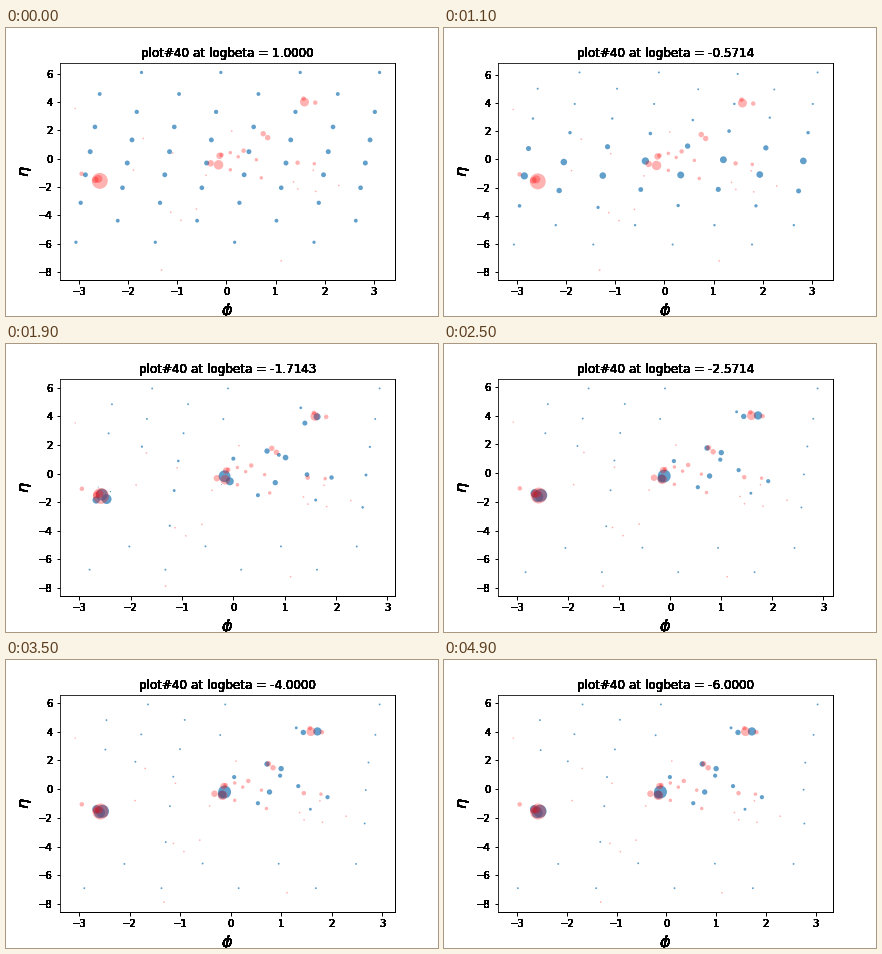
Animation, 432 px wide and 288 px high, one loop 5 s. Source, as a matplotlib script:

```python
import numpy as np
import matplotlib.pyplot as plt
from matplotlib.animation import FuncAnimation
from matplotlib.text import Text
from matplotlib.ticker import MultipleLocator

FRAMES, INTERVAL = 50, 100
ROWS, COLS = 12, 4
SPREAD_END = 11            # frame where the lattice is evenly spaced
TEXT_PASSES = 16
PIXELS = np.array([49.0, 14.2])   # per unit of phi and eta
SWALLOW = 40               # reach of a heavy dot, in pixels

# (phi, eta, diameter) of the clumps in the fixed cloud.
CLUMPS = np.array([
    (-2.58, -1.56, 16), (-2.61, -1.42, 8), (-2.67, -1.49, 6.5),
    (-2.95, -1.06, 4.5), (-0.16, -0.43, 9.5), (-0.14, 0.21, 6.5),
    (-0.32, -0.32, 6.5), (-0.10, 0.28, 4.5), (1.59, 4.01, 9),
    (1.57, 4.25, 4.5), (1.81, 3.97, 4.5), (0.75, 1.77, 5.5),
    (0.84, 1.49, 5.5), (0.35, 0.57, 4.5), (1.45, -0.28, 4.5),
    (0.08, 0.43, 3.5), (0.08, -0.78, 3.5), (0.24, 0.14, 3.5),
    (0.71, -1.35, 3.5), (0.61, -0.07, 3.5), (1.79, -0.35, 3.5),
    (-3.08, 3.55, 1.5), (-1.32, -7.87, 1.8),
])

# Where the heavy moving dots settle, largest first.
SEATS = np.array([
    (-2.54, -1.54, 13), (-0.12, -0.20, 13), (-2.60, -1.64, 11),
    (-2.66, -1.40, 8.3), (-0.17, -0.38, 8.3), (1.72, 4.02, 8.3),
    (1.44, 3.95, 5.4), (0.72, 1.75, 5.4), (1.00, 1.43, 5.4),
    (0.77, -0.20, 5.4), (0.07, 0.84, 4.2), (0.98, 0.94, 4.2),
    (0.54, -0.98, 4.2), (1.34, 0.21, 4.2), (1.92, -0.56, 4.2),
    (1.30, 4.27, 2.9), (1.58, -1.40, 2.9),
])

rng = np.random.default_rng(4)
row, col = (grid.ravel() for grid in np.mgrid[:ROWS, :COLS])
depth = 2 * row / (ROWS - 1) - 1     # -1 at the top row, 1 at the bottom
drift = rng.normal(0, 0.1, (ROWS * COLS, 2))


def smoothstep(t):
    t = np.clip(t, 0, 1)
    return t * t * (3 - 2 * t)


def gathering(frame):
    return smoothstep((frame - 9) / 14)


def lattice(frame):
    """Staggered rows that even out, then sag and wander a little."""
    s = min(frame / SPREAD_END, 1)
    late = max(frame - SPREAD_END, 0) / (FRAMES - 1 - SPREAD_END)
    right = np.interp(frame, [0, SPREAD_END, 19, FRAMES - 1],
                      [3.12, 3.12, 2.85, 3.04])
    x = -1.68 - 0.78 * (row % 2) - 0.047 * row + 1.57 * col
    x = x * right / x.max()
    y = (0.1 + 0.3 * s * (1 - depth**2)
         - (4.4 + 1.15 * s) * depth - (1.6 - 1.05 * s) * depth**3)
    y -= gathering(frame) * depth**2 * (0.6 + 0.3 * depth)
    inner = (1 - np.abs(depth))[:, None]
    return np.column_stack([x, y]) + inner * drift * late


def lattice_sizes(frame):
    s = min(frame / SPREAD_END, 1)
    even = 5 - 1.7 * depth**2
    peaked = 2 + 5.2 * np.exp(-((depth - 0.17) / 0.4)**2)
    return (1 - s) * even + s * peaked


def choose_seats():
    """Each seat takes its nearest free dot; other close dots are swallowed."""
    gap = (lattice(SPREAD_END)[:, None] - SEATS[None, :, :2]) * PIXELS
    distance = np.hypot(gap[..., 0], gap[..., 1])
    seat = np.full(len(row), -1)
    for k in range(len(SEATS)):
        seat[np.where(seat < 0, distance[:, k], np.inf).argmin()] = k
    heavy = seat >= 0
    swallowed = ~heavy & (distance.min(axis=1) < SWALLOW)
    seat[swallowed] = distance[swallowed].argmin(axis=1)
    final_size = np.where(heavy, SEATS[seat, 2], np.where(swallowed, 0, 1.9))
    return seat, final_size


seat, final_size = choose_seats()


def cloud_at(frame):
    p = gathering(frame)
    home = lattice(frame)
    goal = np.where(seat[:, None] >= 0, SEATS[seat, :2], home)
    return ((1 - p) * home + p * goal,
            (1 - p) * lattice_sizes(frame) + p * final_size)


def padded(values):
    lo, hi = values.min(), values.max()
    margin = 0.05 * (hi - lo)
    return lo - margin, hi + margin


# Repeated passes harden the soft edges of the lettering.
plain_draw = Text.draw


def hard_draw(self, renderer):
    for _ in range(TEXT_PASSES):
        plain_draw(self, renderer)


Text.draw = hard_draw

specks = np.column_stack([rng.uniform(-2.7, 2.8, 14),
                          rng.uniform(-7.3, 3, 14), np.full(14, 1.7)])
fixed = np.vstack([CLUMPS, specks])

fig, ax = plt.subplots(figsize=(6, 4), dpi=72, facecolor="white")
fig.subplots_adjust(left=0.125, right=0.9, bottom=0.125, top=0.88)
moving = ax.scatter(*lattice(0).T, s=lattice_sizes(0)**2,
                    color="tab:blue", alpha=0.7, linewidths=0)
ax.scatter(*fixed[:, :2].T, s=fixed[:, 2]**2,
           color="red", alpha=0.3, linewidths=0)
ax.xaxis.set_major_locator(MultipleLocator(1))
ax.yaxis.set_major_locator(MultipleLocator(2))
ax.tick_params(width=1)
for side, spine in ax.spines.items():
    spine.set_linewidth(0.8 if side in ("left", "top") else 1)
ax.set_xlabel(r"$\phi$", fontsize=16)
ax.set_ylabel(r"$\eta$", fontsize=16)
title = ax.set_title("")


def update(frame):
    dots, sizes = cloud_at(frame)
    moving.set_offsets(dots)
    moving.set_sizes(sizes**2)
    everything = np.vstack([dots, fixed[:, :2]])
    ax.set_xlim(padded(everything[:, 0]))
    ax.set_ylim(padded(everything[:, 1]))
    title.set_text(f"plot#40 at logbeta = {1 - frame / 7:.4f}")
    return moving, title


anim = FuncAnimation(fig, update, frames=FRAMES, interval=INTERVAL,
                     repeat=True, repeat_delay=0)
plt.show()
```
